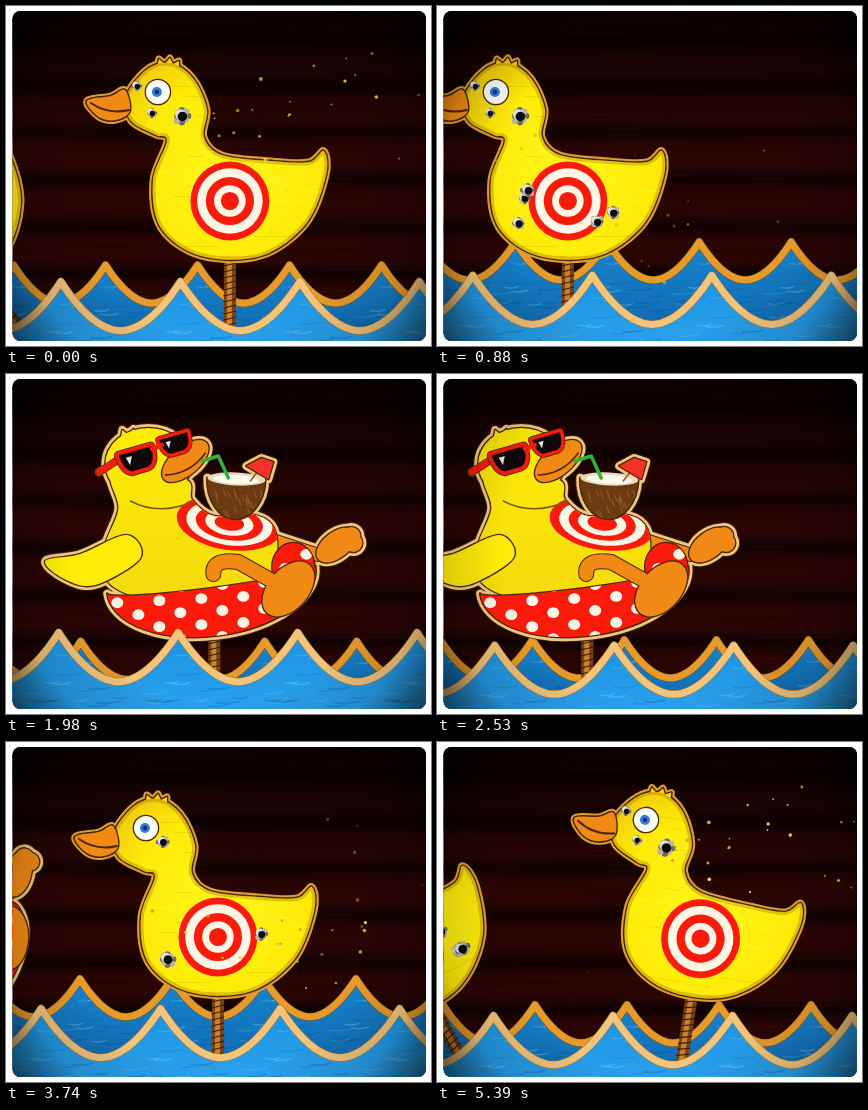
These frames come from a looping animation (425 by 340 pixels, 5.5 s). An HTML page with a canvas:

```html
<!DOCTYPE html>
<html lang="en">
<head>
<meta charset="utf-8">
<title>Duck gallery</title>
<style>
html, body { margin: 0; width: 100%; height: 100%; overflow: hidden; background: #fff; }
canvas { display: block; width: 425px; height: 340px; }
</style>
</head>
<body>
<canvas id="stage" width="425" height="340"></canvas>
<script>
const LOOP = 5500, TAU = Math.PI * 2, W = 425, H = 340;
const YELLOW = '#ffeb08', RED = '#fb1b0c', CREAM = '#fff6e6', ORANGE = '#f08a14', TAN = '#e8b661', INK = '#4a2606';
const ctx = document.getElementById('stage').getContext('2d');

const rand = n => { const v = Math.sin(n * 127.1 + 11.7) * 43758.5453; return v - Math.floor(v); };
const mod = (a, b) => ((a % b) + b) % b;

// Closed Catmull-Rom curve through a few points
function curve(...pts) {
  const path = new Path2D(), n = pts.length;
  path.moveTo(...pts[0]);
  pts.forEach((b, i) => {
    const a = pts[mod(i - 1, n)], c = pts[(i + 1) % n], d = pts[(i + 2) % n];
    path.bezierCurveTo(b[0] + (c[0] - a[0]) / 6, b[1] + (c[1] - a[1]) / 6,
      c[0] - (d[0] - b[0]) / 6, c[1] - (d[1] - b[1]) / 6, c[0], c[1]);
  });
  path.closePath();
  return path;
}
function oval(x, y, rx, ry = rx, rot = 0) {
  const path = new Path2D();
  path.ellipse(x, y, rx, ry, rot, 0, TAU);
  return path;
}
const tuft = (x, y) => new Path2D(`M${x} ${y}l2 -10 6 5 5 -6 3 6 6 -3 0 11z`);

function fill(path, color) { ctx.fillStyle = color; ctx.fill(path); }
function line(path, color, width) { ctx.strokeStyle = color; ctx.lineWidth = width; ctx.stroke(path); }
function inked(color, ...parts) {
  for (const s of parts) line(s, INK, 2.6);
  for (const s of parts) fill(s, color);
}
function inside(path, draw) { ctx.save(); ctx.clip(path); draw(); ctx.restore(); }

function pole(top) {
  ctx.fillStyle = '#7a4312';
  ctx.fillRect(-6, top, 12, 10 - top);
  ctx.fillStyle = '#c98330';
  ctx.fillRect(-3, top, 5, 10 - top);
  for (let y = top + 3; y < 5; y += 6) line(new Path2D(`M-6 ${y + 3}L6 ${y}`), '#3a1c06', 1.2);
}

function rings(x, y, rx, ry, widths, rot) {
  widths.forEach((k, i) => fill(oval(x, y, rx * k, ry * k, rot), i % 2 ? CREAM : RED));
}

function hole(x, y, r, seed) {
  for (let i = 0; i < 8; i++) {
    const a = i / 8 * TAU, d = r * (.6 + .4 * rand(seed + i));
    fill(oval(x + Math.cos(a) * d, y + Math.sin(a) * d, r * .45), i % 2 ? '#b5b3a6' : '#6f6d62');
  }
  fill(oval(x - 1.5, y - 1.5, r * .75), '#e4e3da');
  fill(oval(x + .5, y + .5, r * .68), '#0c0a0c');
}

// Shots on the face come first, then volleys of [phase, count] over the body
function shots(seed, face, volleys) {
  const list = face.map(([x, y, r], i) => ({ at: -420 + i * 70, x, y, r }));
  for (const [from, count] of volleys) {
    for (let i = 0; i < count; i++) {
      const k = seed + list.length * 5, side = list.length % 2 ? -1 : 1;
      list.push({ at: from + i * 93, x: side * (20 + 38 * rand(k)), y: -25 + 48 * rand(k + 1), r: 5 + 2 * rand(k + 2) });
    }
  }
  return list;
}

// Duck coordinates are measured from the bullseye
const duckBody = curve([-104, -104], [-84, -131], [-60, -138], [-37, -123], [-23, -92], [-26, -64], [-8, -46],
  [41, -40], [79, -39], [94, -50], [96, -25], [76, 23], [31, 55], [-29, 55], [-69, 27], [-77, -20],
  [-63, -60], [-74, -66], [-99, -80]);
const duckBill = curve([-143, -100], [-119, -105], [-105, -111], [-100, -90], [-114, -81], [-131, -84]);
const duckTuft = tuft(-73, -132);

function duck(p, hits) {
  const parts = [duckTuft, duckBody, duckBill];
  pole(-92);
  ctx.translate(0, -145);
  for (const s of parts) line(s, '#dd9c38', 7);
  for (const s of parts) line(s, INK, 2.8);
  const g = ctx.createRadialGradient(0, -25, 30, 0, -35, 125);
  g.addColorStop(0, '#fff214');
  g.addColorStop(.6, YELLOW);
  g.addColorStop(1, '#f2cf0c');
  fill(duckTuft, g);
  fill(duckBody, g);
  inside(duckBody, () => {
    line(duckBody, 'rgba(150,90,0,.3)', 6);
    for (let i = 0; i < 38; i++) {
      ctx.fillStyle = i % 2 ? 'rgba(150,110,0,.14)' : 'rgba(255,255,150,.22)';
      ctx.fillRect(-85 + rand(i) * 165, -130 + i * 5, 15 + 40 * rand(i + 50), 1);
    }
  });
  inked(ORANGE, duckBill);
  line(new Path2D('M-139 -98Q-122 -86 -101 -91'), INK, 2);
  inked('#fdfcf4', oval(-72, -109, 12));
  fill(oval(-73, -109, 5), '#2f7be8');
  fill(oval(-73, -109, 2.2), '#123066');
  rings(0, 0, 39.5, 39.5, [1, .83, .61, .4, .23]);
  hits.forEach((h, i) => { if (p >= h.at) hole(h.x, h.y, h.r, i * 13); });
}

const head = oval(86, 90, 43, 36);
const torso = curve([52, 100], [122, 105], [130, 126], [152, 142], [187, 140], [209, 150], [215, 175],
  [205, 215], [110, 228], [50, 212], [42, 175], [56, 135]);
const headTuft = tuft(58, 66);
const wing = curve([-17, 187], [18, 180], [64, 161], [78, 184], [33, 211], [2, 205]);
const ring = new Path2D();
ring.ellipse(149, 206, 105, 56, -.13, 0, Math.PI);
ring.ellipse(149, 206, 105, 8, -.13, Math.PI, 0, true);
const ringEnd = oval(231, 193, 21, 24);
const nearShin = new Path2D('M151 200Q150 184 176 188L210 207'), nearFoot = oval(226, 215, 32, 20, -.85);
const farShin = new Path2D('M213 167L256 181');
const farFoot = [oval(274, 171, 23, 13, -.65), oval(289, 162, 9), oval(291, 169, 9)];
const swimBill = oval(123, 87, 28, 14, -.7);
const bowl = new Path2D();
bowl.ellipse(174, 105, 29, 40, .04, 0, Math.PI);
const umbrella = new Path2D('M184 92L199 84 211 88 206 105Z');
const lens = new Path2D('M-16 -9L16 -9Q16 7 8 9L-8 9Q-15 6 -16 -9Z');
const arm = new Path2D('M37 98L60 83');

function limb(path, width) {
  line(path, INK, width + 2);
  line(path, ORANGE, width);
}

function swimmer(p, hits, tilt) {
  pole(-82);
  ctx.translate(-152, -H);
  const cutout = [head, headTuft, torso, wing, ring, ringEnd, ...farFoot, swimBill, bowl, umbrella, arm];
  const edge = (color, w) => { for (const s of cutout) line(s, color, w); line(farShin, color, w + 12); };
  edge('#3a2207', 10);
  edge('#f0c682', 8);

  inked(RED, ringEnd);
  limb(farShin, 12);
  inked(ORANGE, ...farFoot);
  const g = ctx.createLinearGradient(90, 60, 90, 230);
  g.addColorStop(0, YELLOW);
  g.addColorStop(1, '#f3da0c');
  inked(g, head, headTuft, torso);
  inside(torso, () => rings(167, 149, 53, 27, [1, .82, .64, .46, .28], .15));
  line(new Path2D('M68 127Q96 142 130 128'), '#7a5a08', 1.5);
  inked(RED, ring, ringEnd);
  for (const part of [ring, ringEnd]) inside(part, () => {
    for (let row = 0; row < 7; row++) {
      for (let x = 34 + row % 2 * 21; x < 260; x += 42) {
        fill(oval(x, 185 + row * 13 - (x - 150) * .05, 6, 5.4), CREAM);
      }
    }
  });
  inked(YELLOW, wing);

  // The front leg dangles while the body leans back
  ctx.save();
  ctx.translate(152, 195);
  ctx.rotate(Math.max(0, tilt) * 1.1);
  ctx.translate(-152, -195);
  limb(nearShin, 14);
  inked(ORANGE, nearFoot);
  line(nearShin, ORANGE, 13);
  ctx.restore();

  inked('#6b3a12', bowl);
  inside(bowl, () => {
    for (let i = 0; i < 22; i++) {
      line(new Path2D(`M${149 + rand(i) * 50} ${114 + rand(i + 40) * 24}l2 6`), '#a3682c', .8);
    }
  });
  fill(oval(174, 105, 29, 6.5, .05), '#eadab8');
  fill(oval(174, 105.5, 23, 4.4, .05), '#fffaf0');
  line(new Path2D('M198 94L188 107'), '#8a5a20', 1.5);
  inked('#f5322a', umbrella);
  inked(ORANGE, swimBill);
  line(new Path2D('M103 101Q128 100 143 79'), INK, 1.5);
  line(new Path2D('M140 87L156 82 166 104'), '#36b03c', 3.5);

  line(arm, INK, 8);
  line(arm, RED, 6.5);
  for (const [x, y, s] of [[75, 86, 1.05], [113, 70, .9]]) {
    ctx.save();
    ctx.translate(x, y);
    ctx.rotate(-.28);
    ctx.scale(s, s);
    line(lens, INK, 9);
    line(lens, RED, 7.5);
    fill(lens, '#0d080c');
    fill(new Path2D('M-10 -5l6 0 -4 8z'), '#e6e2e2');
    ctx.restore();
  }
  line(new Path2D('M90 75L99 71'), RED, 5);
}

const RIDERS = [
  { start: 0, draw: duck, hits: shots(3, [[-93, -115, 4], [-78, -88, 4], [-48, -85, 7]], [[60, 5], [1000, 3]]) },
  { start: 1833, draw: swimmer, hits: [] },
  { start: 3627, draw: duck, hits: shots(8, [[-55, -95, 5]], [[-190, 2], [560, 5], [1100, 1]]) }
];

// Upright across the middle, leaning in on entry and out on exit
const lean = p => Math.PI / 180 * (p < 0 ? -.08 * p : Math.min(0, .068 * (1340 - p)));
const slide = p => 224 - .1057 * p + 40 * Math.max(0, lean(p));
const phase = (r, t) => mod(t - r.start + 1500, LOOP) - 1500;

function rider(r, t) {
  const p = phase(r, t);
  if (p < -800 || p > 2300) return;
  let squash = 0;
  for (const h of r.hits) {
    const u = (p - h.at) / 170;
    if (u > 0 && u < 1) squash = Math.max(squash, Math.sin(u * Math.PI));
  }
  ctx.save();
  ctx.translate(slide(p), H);
  ctx.rotate(lean(p));
  ctx.scale(1 - .02 * squash, 1 - .11 * squash);
  r.draw(p, r.hits, lean(p));
  ctx.restore();
}

function sparks(r, t) {
  const p = phase(r, t);
  r.hits.forEach((h, n) => {
    const age = (p - h.at) / 1000;
    if (age < .03 || age > .7) return;
    const c = Math.cos(lean(h.at)), s = Math.sin(lean(h.at));
    const x0 = slide(h.at) + h.x * c - (h.y - 145) * s, y0 = H + h.x * s + (h.y - 145) * c;
    ctx.globalAlpha = Math.min(1, (.7 - age) * 2.2);
    for (let i = 0; i < 9; i++) {
      const k = n * 31 + i * 7 + r.start, a = rand(k) * TAU;
      const d = (100 + 500 * rand(k + 3)) * (1 - Math.exp(-3 * age)) / 3;
      fill(oval(x0 + Math.cos(a) * d, y0 + Math.sin(a) * d * .75 + 120 * age * age, .8 + 1.1 * rand(k + 5)),
        i % 3 ? '#cfa52a' : '#f0d040');
    }
  });
  ctx.globalAlpha = 1;
}

function waves(o) {
  const path = new Path2D(), half = o.gap / 2, first = o.x - Math.ceil((o.x + 20) / o.gap) * o.gap;
  const rise = x => {
    const u = Math.abs(mod(x - o.x + half, o.gap) - half) / half;
    return o.y + o.h * (1 - Math.pow(1 - u, 1.9));
  };
  for (let x = first; x < W + 20; x += half / 30) path.lineTo(x, rise(x));
  const body = new Path2D(path);
  body.lineTo(W + 20, 360);
  body.lineTo(first, 360);
  const g = ctx.createLinearGradient(0, o.y, 0, H);
  g.addColorStop(0, o.top);
  g.addColorStop(1, o.low);
  fill(body, g);
  inside(body, () => {
    for (let x = first; x < W + 20; x += o.gap) {
      for (let i = 0; i < 24; i++) {
        const bx = x + rand(i + 9) * o.gap, by = rise(bx) + 8 + rand(i + 70) * 55;
        line(new Path2D(`M${bx} ${by}q8 2 ${10 + 15 * rand(i + 4)} -1`),
          i % 2 ? 'rgba(140,215,255,.3)' : 'rgba(0,60,120,.22)', .7 + rand(i));
      }
    }
  });
  ctx.save();
  ctx.translate(0, 3);
  line(path, o.shade, 8);
  line(path, o.rim, 7);
  ctx.restore();
}

function backdrop() {
  ctx.fillStyle = '#290504';
  ctx.fillRect(0, 0, W, H);
  for (let y = 33; y < H; y += 47) {
    const g = ctx.createLinearGradient(0, y - 14, 0, y + 14);
    g.addColorStop(0, 'rgba(5,0,0,0)');
    g.addColorStop(.5, 'rgba(5,0,0,.65)');
    g.addColorStop(1, 'rgba(5,0,0,0)');
    ctx.fillStyle = g;
    ctx.fillRect(0, y - 14, W, 28);
  }
  for (let i = 0; i < 110; i++) {
    ctx.fillStyle = i % 2 ? 'rgba(90,20,12,.16)' : 'rgba(0,0,0,.22)';
    ctx.fillRect(rand(i) * W - 40, rand(i + 200) * H, 30 + 110 * rand(i + 400), 1.5);
  }
  const top = ctx.createLinearGradient(0, 0, 0, 130);
  top.addColorStop(0, 'rgba(0,0,0,.75)');
  top.addColorStop(1, 'rgba(0,0,0,0)');
  ctx.fillStyle = top;
  ctx.fillRect(0, 0, W, 130);
}

function vignette() {
  const g = ctx.createRadialGradient(213, 180, 150, 213, 180, 265);
  g.addColorStop(0, 'rgba(0,0,0,0)');
  g.addColorStop(.5, 'rgba(0,0,0,.14)');
  g.addColorStop(1, 'rgba(0,0,0,.7)');
  ctx.fillStyle = g;
  ctx.fillRect(0, 0, W, H);
}

const panel = new Path2D();
panel.roundRect(6.5, 5, 413.5, 330, 8);

function render(t) {
  const swing = (peak, amp) => amp * Math.cos((t - peak) / 2750 * TAU);
  ctx.fillStyle = '#fff';
  ctx.fillRect(0, 0, W, H);
  ctx.lineJoin = ctx.lineCap = 'round';
  inside(panel, () => {
    backdrop();
    waves({ x: 266 + swing(100, 18), y: 250 + swing(2225, 17), gap: 92, h: 38,
      top: '#1885cf', low: '#0f66ab', rim: '#e59a2c', shade: '#7a4a10' });
    for (const r of RIDERS) rider(r, t);
    for (const r of RIDERS) sparks(r, t);
    waves({ x: 46.5 + swing(-330, 11.5), y: 264 + swing(290, 11), gap: 119.5, h: 49,
      top: '#1c93e2', low: '#2ba2ec', rim: '#f2c47c', shade: '#a8712a' });
    vignette();
  });
}

const begin = performance.now();
function tick() {
  render((performance.now() - begin) % LOOP);
  requestAnimationFrame(tick);
}
tick();
</script>
</body>
</html>
```
